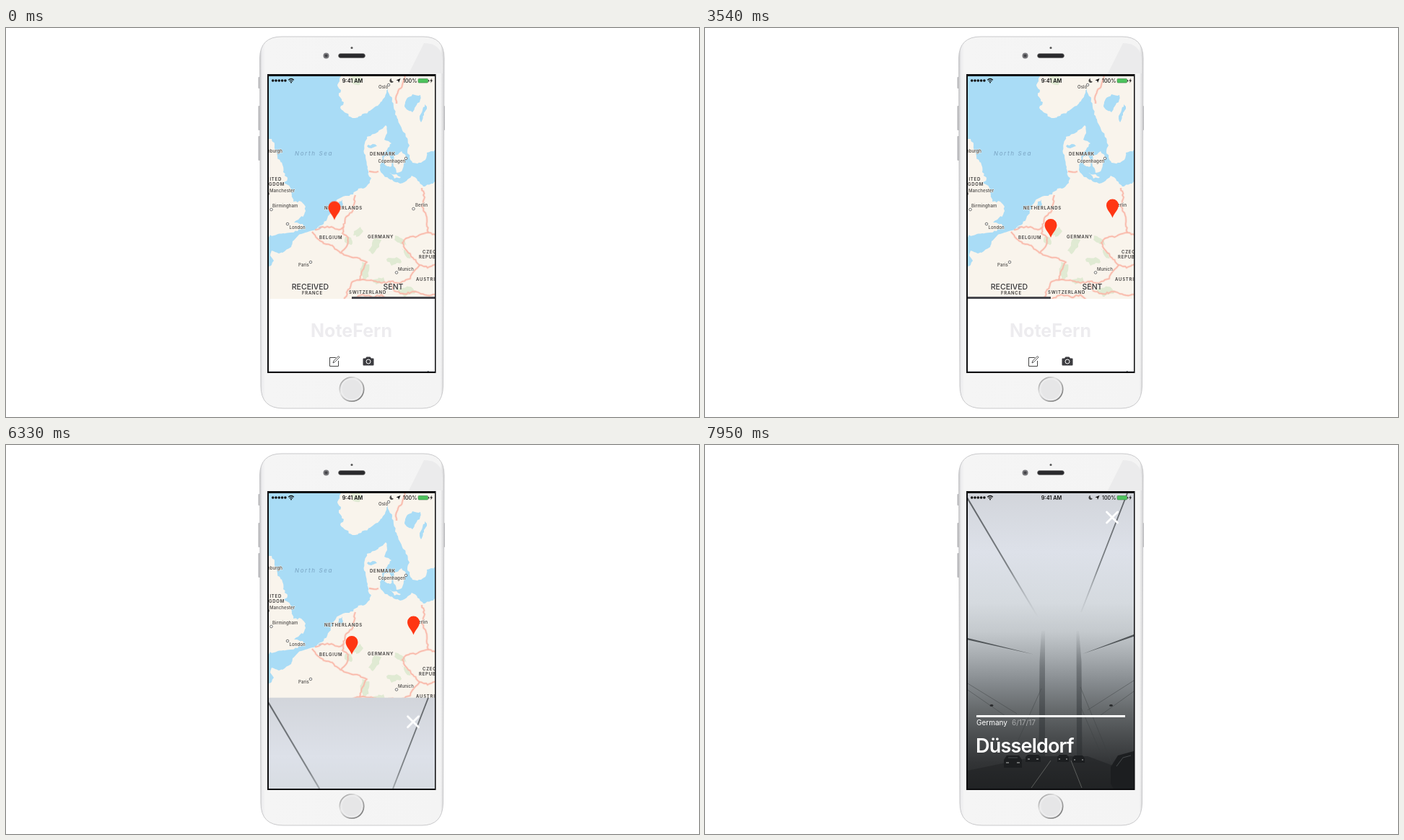
Animation of 960 by 540 pixels, one loop 8 s. Source, as an HTML page:

```html
<!DOCTYPE html>
<html lang="en">
<head>
<meta charset="utf-8">
<title>Travel map</title>
<style>
  html, body { margin: 0; width: 100%; height: 100%; overflow: hidden; background: #fff; }
  svg { display: block; width: 960px; height: 540px; font-family: Inter, "Noto Sans", sans-serif; }
  .country { font-size: 6px; font-weight: 600; letter-spacing: .75px; fill: #3d3b3a; }
  .city { font-size: 6px; font-weight: 500; letter-spacing: .1px; fill: #4a4846; }
  .halo { paint-order: stroke; stroke: #f9f4ec; stroke-width: 1px; stroke-linejoin: round; }
  .tab { font-size: 10.5px; font-weight: 500; fill: #353538; text-anchor: middle; }
  .bar { animation: bar 8s infinite; }
  .sent { animation: sent 8s step-end infinite; }
  .received { animation: received 8s step-end infinite; }
  .sheet { animation: sheet 8s infinite; }
  @keyframes bar {
    0%, 34.5% { transform: translateX(115px); }
    37.5%, 100% { transform: none; }
  }
  @keyframes sent { 0% { opacity: 1; } 34.5%, 100% { opacity: 0; } }
  @keyframes received { 0% { opacity: 0; } 34.5%, 100% { opacity: 1; } }
  @keyframes sheet {
    0%, 78.65% { transform: translateY(409px); animation-timing-function: ease; }
    81.03%, 100% { transform: none; }
  }
</style>
</head>
<body>
<svg viewBox="0 0 960 540">
  <defs>
    <clipPath id="screen"><rect x="364" y="67" width="230" height="409.5"/></clipPath>
    <clipPath id="mapArea"><rect x="364" y="67" width="230" height="309"/></clipPath>
    <linearGradient id="rim" x1="0" x2="1" y1="0" y2="0">
      <stop offset="0" stop-color="#c4c4c6"/><stop offset=".012" stop-color="#ececee"/>
      <stop offset=".03" stop-color="#f5f5f5"/><stop offset=".98" stop-color="#f4f4f4"/>
      <stop offset="1" stop-color="#d0d0d2"/>
    </linearGradient>
    <linearGradient id="ring" x1="0" y1="0" x2="1" y2="1">
      <stop offset="0" stop-color="#858585"/><stop offset=".35" stop-color="#e4e4e4"/>
      <stop offset=".65" stop-color="#a4a4a4"/><stop offset="1" stop-color="#6a6a6a"/>
    </linearGradient>
    <linearGradient id="fog" x1="0" x2="0" y1="67" y2="477" gradientUnits="userSpaceOnUse">
      <stop offset="0" stop-color="#d2d5db"/><stop offset=".2" stop-color="#dde1e9"/>
      <stop offset=".37" stop-color="#d5dadf"/><stop offset=".47" stop-color="#c4c9cd"/>
      <stop offset=".55" stop-color="#a8adb1"/><stop offset=".64" stop-color="#868b8f"/>
      <stop offset=".74" stop-color="#636769"/><stop offset=".82" stop-color="#4b4e50"/>
      <stop offset=".91" stop-color="#333537"/><stop offset="1" stop-color="#232526"/>
    </linearGradient>
    <linearGradient id="cable" x1="0" x2="0" y1="67" y2="240" gradientUnits="userSpaceOnUse">
      <stop offset="0" stop-color="#5c6064"/><stop offset=".6" stop-color="#7d8286"/>
      <stop offset="1" stop-color="#a0a6ab" stop-opacity="0"/>
    </linearGradient>
    <linearGradient id="pylon" x1="0" x2="0" y1="255" y2="435" gradientUnits="userSpaceOnUse">
      <stop offset="0" stop-color="#4b5054" stop-opacity="0"/><stop offset=".3" stop-color="#4b5054" stop-opacity=".5"/>
      <stop offset="1" stop-color="#2e3133" stop-opacity=".85"/>
    </linearGradient>
    <path id="pin" d="M0 0C-2-6.5-8.5-11-8.5-17.5A8.5 8.5 0 0 1 8.5-17.5C8.5-11 2-6.5 0 0Z" fill="#ff3613"/>
  </defs>

  <!-- handset -->
  <g fill="#b6b6b9">
    <rect x="349.5" y="68" width="3" height="16" rx="1"/>
    <rect x="349.5" y="108" width="3" height="34" rx="1"/>
    <rect x="349.5" y="150" width="3" height="34" rx="1"/>
    <rect x="605.5" y="108" width="2.5" height="34" rx="1"/>
  </g>
  <path d="M382 12H578Q607 12 607 42L605.5 497Q605 528 576 528H384Q353 528 353 497L351.5 42Q352 12 382 12Z" fill="url(#rim)" stroke="#c9c9cb"/>
  <path d="M579 21Q604 21 605 46V63H558Z" fill="#ebebec"/>
  <circle cx="443.5" cy="38.5" r="4" fill="#77777b"/>
  <circle cx="443.5" cy="38.5" r="2" fill="#424246"/>
  <circle cx="479" cy="27.5" r="1.5" fill="#555"/>
  <rect x="460.5" y="35.5" width="37" height="6" rx="3" fill="#2a2a2d" stroke="#777" stroke-width=".6"/>
  <circle cx="479" cy="501.5" r="16.7" fill="#ececed" stroke="url(#ring)" stroke-width="1.7"/>
  <circle cx="479" cy="501.5" r="13.5" fill="#e6e6e7"/>
  <rect x="362" y="64" width="233.5" height="415" fill="#0c0c0e"/>

  <g clip-path="url(#screen)">
    <rect x="364" y="67" width="230" height="410" fill="#fff"/>
    <g clip-path="url(#mapArea)">
      <rect x="364" y="67" width="230" height="310" fill="#a9dcf6"/>
      <g id="map"></g>
      <g id="labels"></g>
    </g>
    <text class="tab halo" x="421.5" y="363">RECEIVED</text>
    <text class="tab halo" x="536.5" y="363">SENT</text>
    <rect class="bar" x="364" y="373" width="115" height="3" fill="#46464c"/>
    <use class="sent" href="#pin" x="455" y="266.5"/>
    <g class="received">
      <use href="#pin" x="479" y="291"/>
      <use href="#pin" x="564.5" y="263.5"/>
    </g>

    <text x="478.5" y="428.5" font-size="25" font-weight="700" text-anchor="middle" fill="#edecef">NoteFern</text>
    <g fill="none" stroke="#444" stroke-width="1">
      <path d="M457 457.5H448.5V469.5H460.5V462"/>
      <path d="M453 465L454 462L460.5 455.5L462 457L455.5 463.7Z" stroke-width=".9"/>
    </g>
    <path d="M495.5 458.5H498L499.5 456.5H504.5L506 458.5H508.5Q509.5 458.5 509.5 459.5V467.5Q509.5 468.5 508.5 468.5H495.5Q494.5 468.5 494.5 467.5V459.5Q494.5 458.5 495.5 458.5Z" fill="#3c3c40"/>
    <circle cx="502" cy="463" r="3" fill="none" stroke="#fff"/>

    <!-- sliding picture -->
    <g class="sheet">
      <rect x="364" y="67" width="230" height="410" fill="url(#fog)"/>
      <g fill="none" stroke="url(#cable)">
        <path d="M363 73L463 242" stroke-width="2"/>
        <path d="M585 67L521 232" stroke-width="1.8"/>
      </g>
      <g fill="#4f5457">
        <path d="M364 268L455 290.5L364 270.5Z"/>
        <path d="M594 263L523 290L594 265.8Z"/>
      </g>
      <g fill="none" stroke="#3d4143" stroke-width=".7" opacity=".65">
        <path d="M364 331L432 373M364 340L416 376M594 327L530 368M594 342L548 375"/>
        <path d="M466 338L431 416M520 336L565 445M521 365L550 432"/>
      </g>
      <path d="M466 258H471V432H462.5L463.5 300ZM514.5 258H518L521.5 300L522.5 432H515Z" fill="url(#pylon)"/>
      <ellipse cx="397" cy="361.5" rx="2.5" ry="1.6" fill="#292b2d"/>
      <ellipse cx="562.5" cy="361.5" rx="2.5" ry="1.6" fill="#292b2d"/>
      <path d="M364 452L460 432H530L594 456V477H364Z" fill="#202224" opacity=".55"/>
      <path d="M479 438L452 476M507 438L522 476" stroke="#8b8d88" stroke-width="1" opacity=".55"/>
      <g fill="#1c1e20">
        <path d="M414 448V437L418 431H435L439 437V448Z"/>
        <path d="M444 440V433L447 430H462L465 434V440ZM488 440V433L491 430H501L504 433V440Z"/>
        <path d="M509 441V434L512 431H523L526 435V441Z"/>
        <path d="M562 470V447L572 431L594 425V477H566Z"/>
      </g>
      <path d="M417 441H421M432 441H436M447 436H450M459 436H462M490 436H492M500 436H502M511 437H513M522 437H524" stroke="#b2b4b3" stroke-width="1.5" opacity=".7"/>
      <path d="M420 434H433M570 446L579 434L590 431" fill="none" stroke="#5a5e60" opacity=".7"/>
      <path d="M556.5 93L571.5 108M571.5 93L556.5 108" stroke="#fff" stroke-width="2.8" stroke-linecap="round"/>
      <rect x="376" y="375" width="206" height="3" fill="#fff"/>
      <g fill="#fff">
        <text x="376" y="388.5" font-size="10">Germany</text>
        <text x="425" y="388.5" font-size="10" opacity=".48">6/17/17</text>
        <text x="375" y="427" font-size="27" font-weight="600" letter-spacing="-.8">Düsseldorf</text>
      </g>
    </g>

    <!-- status bar -->
    <g fill="#111">
      <path d="M369.7 73H387" stroke="#111" stroke-width="3.6" stroke-linecap="round" stroke-dasharray="0 4.3"/>
      <path d="M391.2 72.2Q395 68.8 398.8 72.2M392.7 74Q395 72 397.3 74" fill="none" stroke="#111" stroke-width="1.2"/>
      <circle cx="395" cy="75.5" r="1"/>
      <text x="480" y="75.8" font-size="7.3" font-weight="600" text-anchor="middle">9:41 AM</text>
      <path d="M534 70A3 3 0 1 0 537 74.5A3.2 3.2 0 0 1 534 70Z" opacity=".75"/>
      <path d="M546.5 70L544 76L543.3 73.2L540.5 72.5Z"/>
      <text x="550" y="75.8" font-size="7.2" font-weight="500">100%</text>
      <rect x="571" y="70.5" width="13.5" height="5.5" rx="1" fill="#4cc35c" stroke="#3f7f49" stroke-width=".6"/>
      <rect x="585.2" y="72" width="1" height="2.5"/>
      <path d="M590 69.8L587.3 73.6H589L588.3 76.5L591 72.6H589.3Z"/>
    </g>
  </g>
</svg>
<script>
  const NS = 'http://www.w3.org/2000/svg';
  const map = document.getElementById('map');
  const labels = document.getElementById('labels');

  function add(parent, tag, attrs, text) {
    const node = document.createElementNS(NS, tag);
    for (const key in attrs) node.setAttribute(key, attrs[key]);
    if (text) node.textContent = text;
    parent.appendChild(node);
  }

  let seed = 41;
  function random() {
    seed = (seed * 16807) % 2147483647;
    return seed / 2147483647 - .5;
  }

  // Break a coarse line into short wobbly pieces.
  function rough(line, wobble, closed) {
    const pts = line.split(' ').map(p => p.split(',').map(Number));
    if (closed) pts.push(pts[0]);
    let d = 'M' + pts[0];
    for (let i = 1; i < pts.length; i++) {
      const [x0, y0] = pts[i - 1], [x1, y1] = pts[i];
      const n = Math.max(1, Math.round(Math.hypot(x1 - x0, y1 - y0) / 3));
      for (let k = 1; k <= n; k++) {
        const w = k < n ? wobble : 0;
        const x = x0 + (x1 - x0) * k / n + random() * w;
        const y = y0 + (y1 - y0) * k / n + random() * w;
        d += 'L' + x.toFixed(1) + ' ' + y.toFixed(1);
      }
    }
    return closed ? d + 'Z' : d;
  }

  const area = (line, fill) => add(map, 'path', { d: rough(line, 2.6, true), fill });
  const land = line => area(line, '#f9f4ec');
  const water = line => area(line, '#a9dcf6');
  const green = line => area(line, '#e0ead3');

  // Scandinavia
  land('464,60 462,70 459,79 464,86 461,94 468,103 463,111 471,118 480,125 492,122 504,115 515,108 522,99 527,90 529,83 531,92 535,99 537,110 541,122 545,133 549,142 556,153 559,163 556,171 559,180 563,187 575,187 581,183 583,173 600,167 600,60');
  water('556,97 563,92 574,93 573,103 566,111 563,117 555,113 552,108');
  water('580,106 583,109 579,121 575,131 573,126 577,114');
  // Denmark
  land('526,135 528,146 524,155 534,160 528,169 522,176 520,187 518,197 521,204 510,210 503,206 501,193 499,184 496,174 497,160 500,151 510,147 519,141');
  land('523,180 531,177 535,185 532,193 525,190');
  land('537,178 548,171 554,179 551,189 548,199 541,201 537,192');
  land('531,201 541,203 547,207 538,209');
  water('500,164 508,161 514,164 506,167');
  // Britain
  land('355,155 368,154 372,163 376,178 383,190 384,200 390,209 385,215 394,222 396,232 398,241 409,241 415,248 413,259 405,266 399,270 411,272 412,277 404,282 394,284 384,285 355,291');
  // Continent
  land('355,333 368,329 371,323 366,316 368,309 378,313 386,310 395,304 397,296 404,289 412,285 421,282 430,279 440,272 448,259 455,244 461,237 470,233 481,231 488,223 497,222 504,215 506,207 505,198 518,198 523,204 530,209 537,213 546,216 555,212 562,205 570,212 578,220 600,212 600,385 355,385');
  water('461,241 466,238 467,245 463,250 460,247');
  water('432,277 440,275 436,279');

  // Forests and hills
  green('482,282 491,276 495,282 489,289 481,288');
  green('470,290 478,291 480,299 473,302 469,297');
  green('510,292 520,294 517,304 508,314 502,309 507,302');
  green('539,288 551,294 555,302 547,300 538,294');
  green('493,325 503,328 502,346 495,350 491,341');
  green('527,321 541,318 548,325 534,330');
  green('508,350 523,346 525,353 513,356');
  green('548,306 557,312 563,322 554,317');
  green('540,363 558,359 570,366 551,373');
  green('474,65 492,65 490,79 482,78');

  function border(line) {
    const pink = { d: rough(line, 2.4), fill: 'none', stroke: '#f9b7a8', 'stroke-linejoin': 'round' };
    add(map, 'path', { ...pink, 'stroke-width': 3, opacity: .4 });
    add(map, 'path', { ...pink, 'stroke-width': 1.3 });
  }
  border('552,65 549,79 543,88 540,97 541,105');
  border('503,199 516,199');
  border('484,232 482,245 479,256 470,264 468,276');
  border('428,280 439,276 451,276 461,280 468,276');
  border('424,283 431,292 443,300 454,304 463,312 478,318 490,320 500,325 494,336 490,350');
  border('468,276 466,285 474,291 472,303 464,312');
  border('490,350 479,353 474,363 469,378');
  border('490,350 506,350 520,354 532,352 546,354 560,348 564,339 573,329');
  border('532,353 538,365 551,369 565,366 583,371 596,370');
  border('576,222 580,235 576,248 582,260 585,284');
  border('585,284 570,289 554,292 549,298 555,309 565,321 573,329 584,333 596,326');
  border('585,284 596,288');
  border('478,377 494,370 508,374 520,370 529,378');

  function label(cls, text, x, y, anchor = 'start') {
    add(labels, 'text', { class: cls + ' halo', x, y, 'text-anchor': anchor }, text);
  }
  const country = (...args) => label('country', ...args);
  function city(text, x, y, cx, cy, anchor) {
    if (cx) add(labels, 'circle', { cx, cy, r: 1.8, fill: '#fff', stroke: '#555', 'stroke-width': .8 });
    label('city', text, x, y, anchor);
  }

  add(labels, 'text', {
    x: 400, y: 177, fill: '#7fabc9', 'font-size': 8,
    'font-style': 'italic', 'font-weight': 500, 'letter-spacing': 1.6
  }, 'North Sea');
  country('DENMARK', 504, 177);
  country('NETHERLANDS', 441, 252);
  country('BELGIUM', 434, 292.5);
  country('GERMANY', 501, 292);
  country('FRANCE', 410, 369.5);
  country('SWITZERLAND', 475, 368.5);
  country('UNITED', 382, 212, 'end');
  country('KINGDOM', 386, 218.5, 'end');
  country('CZECH', 577, 313);
  country('REPUBLIC', 572, 319.5);
  country('AUSTRIA', 568, 351);
  city('Oslo', 516, 84, 530, 79);
  city('Copenhagen', 515.5, 186.5, 554, 181);
  city('Edinburgh', 383, 172.5, 0, 0, 'end');
  city('Manchester', 365, 228, 363, 230);
  city('Birmingham', 369, 249, 367.5, 252);
  city('London', 392.5, 278.5, 390, 272);
  city('Paris', 405, 331, 422, 325);
  city('Berlin', 567, 247.5, 564.5, 251);
  city('Munich', 543, 337, 541, 339.5);
</script>
</body>
</html>
```
